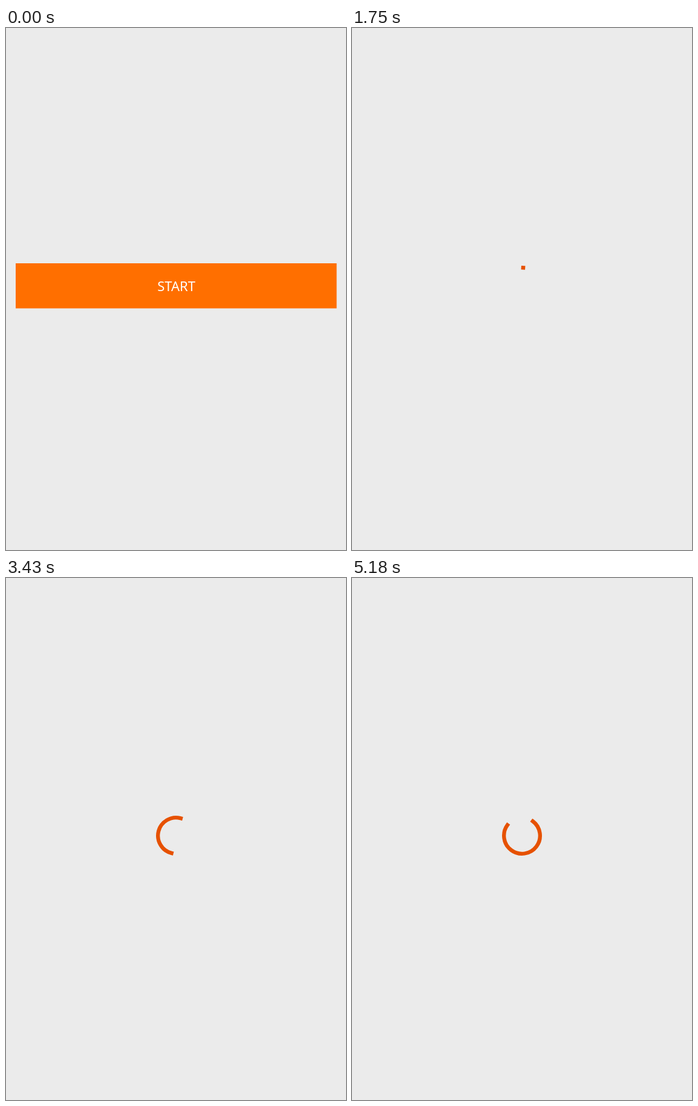
Write an HTML page that moves like this. It is 562 px wide and 863 px high and loops after 5.25 s.

```html
<!DOCTYPE html>
<html lang="en">
<head>
<meta charset="utf-8">
<title>Start button to spinner</title>
<style>
  html, body {
    margin: 0;
    width: 100%;
    height: 100%;
    overflow: hidden;
    background: #ebebeb;
  }
  svg { display: block; width: 562px; height: 863px; }
  .label {
    font: 500 22px "Noto Sans", "Open Sans", sans-serif;
    fill: #fff;
    text-anchor: middle;
  }
  .spinner {
    fill: none;
    stroke: #e65100;
    stroke-width: 6.3;
    stroke-linecap: square;
  }
</style>
</head>
<body>
<svg viewBox="0 0 562 863">
  <clipPath id="reveal"><circle id="hole" cx="281.3" cy="426.3" r="400"/></clipPath>
  <g id="button" clip-path="url(#reveal)">
    <rect x="16" y="389" width="530.5" height="74.5" fill="#ff6f00"/>
    <text class="label" x="281.5" y="434.5">START</text>
  </g>
  <circle id="spinner" class="spinner" cx="281" cy="426" r="29.8" pathLength="360" visibility="hidden"/>
</svg>
<script>
  const LOOP = 5250, STEP = 70;
  const SHRINK_START = 830, SHRINK_TIME = 915, FULL_RADIUS = 265.5;
  const SPIN_START = 1729, SPIN_CYCLE = 1400;

  const button = document.getElementById("button");
  const hole = document.getElementById("hole");
  const spinner = document.getElementById("spinner");
  const clamp = x => Math.min(1, Math.max(0, x));

  // cubic-bezier(.4, 0, .2, 1)
  function ease(x) {
    x = clamp(x);
    let lo = 0, hi = 1;
    for (let i = 0; i < 24; i++) {
      const s = (lo + hi) / 2, r = 1 - s;
      if (1.2 * r * r * s + 0.6 * r * s * s + s * s * s < x) lo = s;
      else hi = s;
    }
    return lo * lo * (3 - 2 * lo);
  }

  function drawButton(t) {
    const k = (t - SHRINK_START) / SHRINK_TIME;
    hole.setAttribute("r", k < 0 ? 400 : FULL_RADIUS * (1 - clamp(k) ** 2));
    button.setAttribute("visibility", k < 1 ? "visible" : "hidden");
    spinner.setAttribute("visibility", k < 1 ? "hidden" : "visible");
  }

  // The head runs ahead in the first half of a cycle, the tail catches up in the second.
  function drawSpinner(t) {
    const turns = Math.max(0, (t - SPIN_START) / SPIN_CYCLE);
    const p = turns % 1;
    const tail = 270 * ease(2 * p - 1);
    const head = 270 * ease(2 * p);
    const angle = 144 * turns + 90 * p + tail - 90;
    spinner.setAttribute("stroke-dasharray", `${Math.max(0.1, head - tail)} 360`);
    spinner.setAttribute("transform", `rotate(${angle} 281 426)`);
  }

  const origin = performance.now();
  function draw() {
    const now = (performance.now() - origin) % LOOP;
    const t = Math.floor(now / STEP) * STEP;
    drawButton(t);
    drawSpinner(t);
    requestAnimationFrame(draw);
  }
  draw();
</script>
</body>
</html>
```
